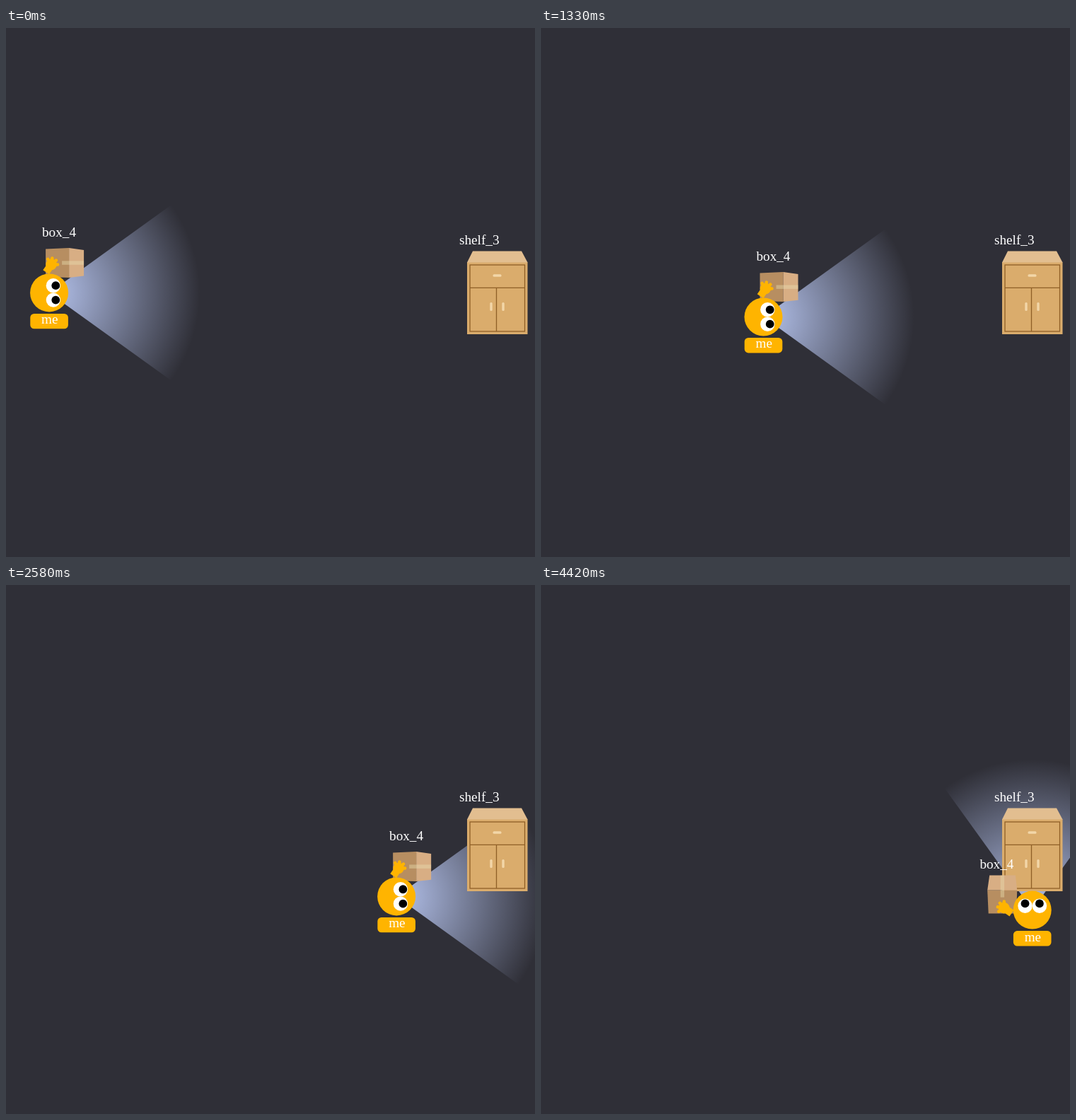
An HTML page with a canvas that plays this animation: 748x748 px, repeating every 4710 ms.

```html
<!DOCTYPE html>
<html lang="en">
<head>
<meta charset="utf-8">
<title>Carrying a box to the shelf</title>
<style>
  html, body { margin: 0; height: 100%; overflow: hidden; background: #2f2f37; }
  canvas { display: block; }
</style>
</head>
<body>
<canvas id="stage" width="748" height="748"></canvas>
<script>
const ctx = document.getElementById('stage').getContext('2d');
const LOOP = 4710, STEP = 1000 / 24;
const START = { x: 61.1, y: 374.4 }, END = { x: 694.7, y: 459.6 };
const WALK_END = 80, TURN_START = 81.5, TURN_END = 106;
const CONE_RADIUS = 213, CONE_HALF = 0.624;
const BOX = { x: 21.7, y: -42.5 };
const YELLOW = '#ffb400';

const clamp01 = v => Math.min(1, Math.max(0, v));
const mix = (a, b, k) => a + (b - a) * k;

function circle(x, y, r, color) {
  ctx.fillStyle = color;
  ctx.beginPath();
  ctx.arc(x, y, r, 0, 2 * Math.PI);
  ctx.fill();
}

function roundRect(x, y, w, h, r, color) {
  ctx.fillStyle = color;
  ctx.beginPath();
  ctx.roundRect(x, y, w, h, r);
  ctx.fill();
}

// A four-sided face between two parallel edges, each given as position, from, to.
function face(vertical, [p, a, b], [q, c, d], color) {
  const point = (u, v) => vertical ? ctx.lineTo(u, v) : ctx.lineTo(v, u);
  ctx.fillStyle = color;
  ctx.beginPath();
  point(p, a);
  point(p, b);
  point(q, d);
  point(q, c);
  ctx.fill();
}

function line(x1, y1, x2, y2, width, color, cap = 'butt') {
  ctx.strokeStyle = color;
  ctx.lineWidth = width;
  ctx.lineCap = cap;
  ctx.beginPath();
  ctx.moveTo(x1, y1);
  ctx.lineTo(x2, y2);
  ctx.stroke();
}

function label(text, x, y) {
  ctx.fillStyle = '#fff';
  ctx.font = '19.2px "Liberation Serif", serif';
  ctx.fillText(text, x, y);
}

function drawCone() {
  const light = ctx.createRadialGradient(0, 0, 0, 0, 0, CONE_RADIUS);
  light.addColorStop(0, 'rgba(180,194,236,1)');
  light.addColorStop(1, 'rgba(180,194,236,0)');
  ctx.fillStyle = light;
  ctx.beginPath();
  ctx.moveTo(0, 0);
  ctx.arc(0, 0, CONE_RADIUS, -CONE_HALF, CONE_HALF);
  ctx.fill();
}

function drawShelf() {
  const trim = '#8f5f27', handle = '#f2d6a8';
  ctx.fillStyle = '#daac6c';
  ctx.fillRect(652, 331, 85.5, 102);
  face(false, [315.5, 660, 729], [331.5, 652, 737.5], '#e2be90');
  line(656, 367.3, 733.5, 367.3, 1.3, trim);
  line(693.5, 367.3, 693.5, 429, 1.3, trim);
  ctx.strokeRect(656, 335, 77.5, 94);
  roundRect(688.5, 348.3, 12, 3.4, 1.5, handle);
  for (const x of [684.3, 701.3]) roundRect(x, 388, 3.4, 12, 1.5, handle);
  label('shelf_3', 641, 306);
}

function drawBox() {
  face(true, [-5, -62], [28, -63.5], '#b78e61');
  face(true, [-5, -62, -22.5], [28, -63.5, -21.5], '#b78e61');
  face(true, [28, -63.5, -21.5], [49, -60.5, -23.8], '#d8ae84');
  ctx.fillStyle = 'rgba(232,222,176,.42)';
  ctx.fillRect(18, -45, 31, 5.4);
}

function drawHead() {
  circle(0, 0, 27, YELLOW);
  for (const side of [-10.2, 10.2]) {
    circle(5.8, side, 10.2, '#fff');
    circle(9.2, side, 5.9, '#000');
  }
}

function drawHand() {
  const x = 3, y = -40;
  line(-4.5, -29.2, x, y, 10.5, YELLOW);
  circle(x, y, 7.8, YELLOW);
  for (let finger = 0; finger < 4; finger++) {
    const angle = -2.15 + finger * 0.72;
    line(x, y, x + 9 * Math.cos(angle), y + 9 * Math.sin(angle), 4.5, YELLOW, 'round');
  }
}

function render(time) {
  const step = Math.floor((time % LOOP + 5) / STEP);
  const walk = clamp01(step / WALK_END);
  const turn = -Math.PI / 2 * clamp01((step - TURN_START) / (TURN_END - TURN_START));
  const x = mix(START.x, END.x, walk), y = mix(START.y, END.y, walk);
  const cos = Math.cos(turn), sin = Math.sin(turn);
  const posed = (...parts) => {
    ctx.save();
    ctx.translate(x, y);
    ctx.rotate(turn);
    parts.forEach(draw => draw());
    ctx.restore();
  };

  ctx.fillStyle = '#2f2f37';
  ctx.fillRect(0, 0, 748, 748);
  posed(drawCone);
  drawShelf();
  posed(drawBox, drawHead, drawHand);
  roundRect(x - 26.8, y + 29.5, 53.6, 21.4, 5.5, YELLOW);
  label('me', x - 11, y + 44);
  // The label follows the centre of the box but stays upright.
  label('box_4', x + BOX.x * cos - BOX.y * sin - 31.8, y + BOX.x * sin + BOX.y * cos - 36.6);
}

const begin = performance.now();
function tick() {
  render(performance.now() - begin);
  requestAnimationFrame(tick);
}
tick();
</script>
</body>
</html>
```
